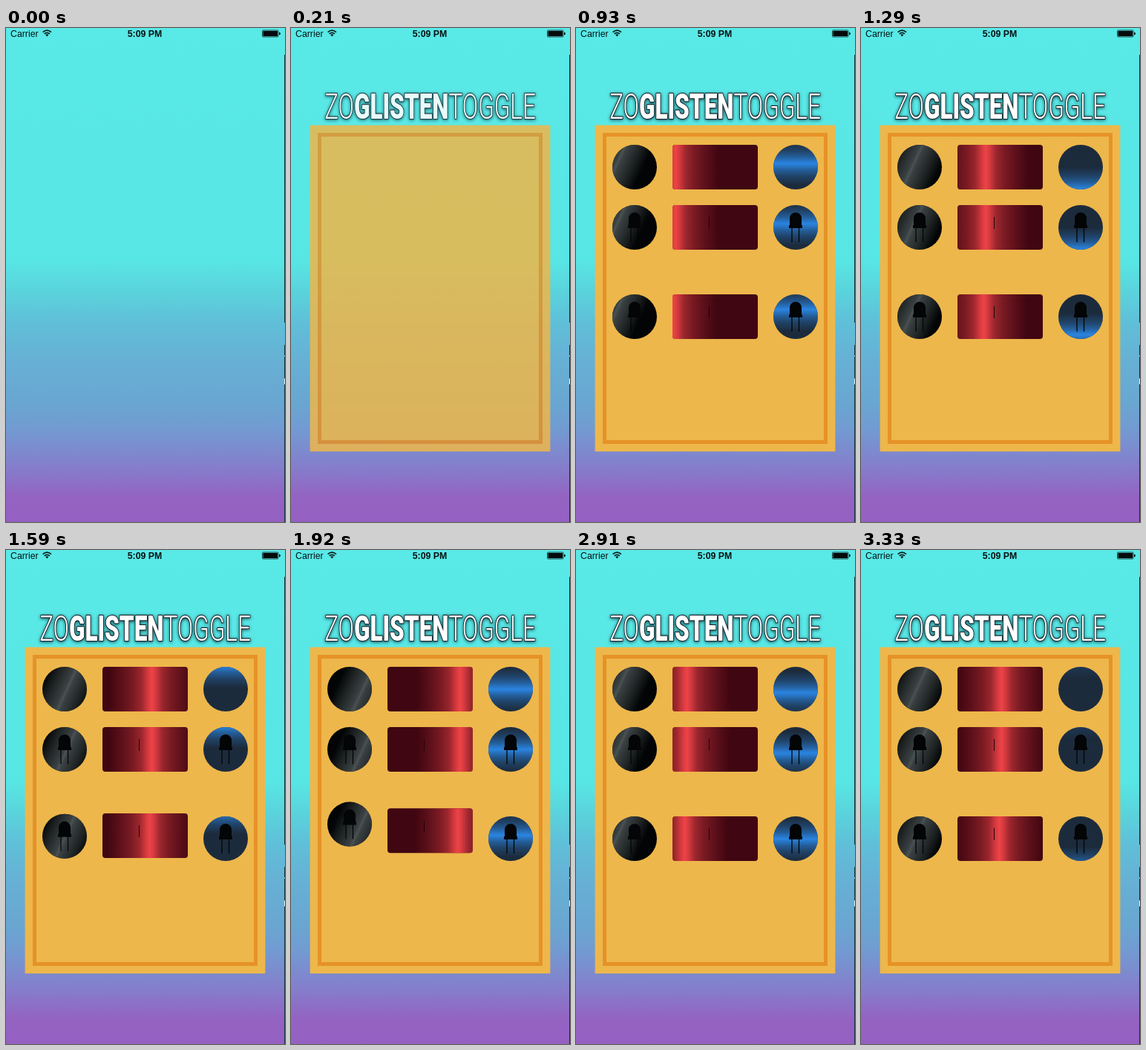
Write an HTML page that moves like this. It is 376 px wide and 664 px high and loops after 3.36 s.

```html
<!DOCTYPE html>
<html lang="en">
<head>
<meta charset="utf-8">
<title>Shimmering buttons</title>
<style>
  html, body { margin: 0; width: 100%; height: 100%; overflow: hidden; background: #59e8e6; }
  svg { display: block; width: 376px; height: 664px; }
  .status { font: 12.3px "Liberation Sans", Arial, sans-serif; fill: #071213; }
  .clock { font-weight: bold; text-anchor: middle; }
  .title {
    font: 300 48.5px Roboto, sans-serif; fill: #fff;
    stroke: #0d1c24; stroke-width: 2.2; stroke-linejoin: round; paint-order: stroke;
  }
  .title .bold { font-weight: 900; }
  .shade { filter: drop-shadow(0 1px 2px rgba(0, 20, 30, .75)); }
</style>
</head>
<body>
<svg viewBox="0 0 376 664" xmlns="http://www.w3.org/2000/svg">
  <defs id="defs">
    <linearGradient id="sky" x1="0" y1="0" x2="0" y2="664" gradientUnits="userSpaceOnUse">
      <stop offset="0" stop-color="#59e9e7"/>
      <stop offset=".47" stop-color="#58e6e4"/>
      <stop offset=".53" stop-color="#5ad4dc"/>
      <stop offset=".6" stop-color="#60bed8"/>
      <stop offset=".68" stop-color="#67afd4"/>
      <stop offset=".76" stop-color="#69a6d1"/>
      <stop offset=".81" stop-color="#729bd2"/>
      <stop offset=".89" stop-color="#857dcb"/>
      <stop offset=".95" stop-color="#9463c2"/>
      <stop offset="1" stop-color="#9560c2"/>
    </linearGradient>
    <g id="led" fill="#030506">
      <path d="M-8-3V-12A8 8 0 0 1 8-12V-3H9V1H-9V-3Z"/>
      <path d="M-5 0V20M4.5 0V20" stroke="#030506" stroke-width="1.3"/>
    </g>
  </defs>

  <rect width="376" height="664" fill="url(#sky)"/>
  <path d="M375.5 36V396M375.5 426V440M375.5 442V471M375.5 479V664" stroke="#12343c"/>
  <path d="M375.5 471V479" stroke="#d5eef2"/>

  <text class="status" x="6" y="11.6">Carrier</text>
  <text class="status clock" x="187" y="11.6">5:09 PM</text>
  <g fill="none" stroke="#0c1b1c" stroke-width="1.7">
    <path d="M49.6 5.6Q55.3 .6 61 5.6M51.7 7.9Q55.3 4.7 58.9 7.9"/>
    <path d="M53.2 9.1Q55.3 7.5 57.4 9.1L55.3 11.6Z" fill="#0c1b1c" stroke="none"/>
  </g>
  <rect x="345.5" y="3" width="21.5" height="9" rx="1.2" fill="none" stroke="#0c1b1c" stroke-width=".8"/>
  <rect x="346.4" y="3.9" width="19.7" height="7.2" rx=".6" fill="#050b0c"/>
  <path d="M368 5.6Q370 6 370 7.5T368 9.4Z" fill="#0c1b1c"/>

  <g id="scene" opacity="0">
    <g class="shade">
      <text class="title" text-anchor="middle" transform="translate(187.5 121.8) scale(.65 1)">ZO<tspan class="bold">GLISTEN</tspan>TOGGLE</text>
    </g>
    <rect x="25.6" y="130.6" width="323.8" height="438.6" fill="#edb74b"/>
    <rect x="38.5" y="143.5" width="298" height="413" fill="none" stroke="#e69227" stroke-width="5"/>
  </g>
  <g id="buttons"></g>
</svg>

<script>
const LOOP = 3360;
const rows = [187, 268, 388];

// mid: a time when the glint crosses the centre; stops: [distance, opacity];
// fade: distance over which the glint dims at both ends of its run
const columns = [
  { x: 79, w: 60, span: 76, speed: .04, mid: 1515, turn: 25, fade: 12, start: 500,
    base: '#020405', glow: '#4a5253', stops: [[0, 1], [3, .78], [12, .57], [22, .33], [34, 0]],
    pops: [[382, .1], [340, .085], [340, .1]], lag: 50,
    hop: [[1500, 0], [1860, -20], [2420, -2], [2700, 0]] },
  { x: 187.5, w: 115, span: 172.5, speed: .0949, mid: 1495, turn: 0, fade: 6, start: 570,
    base: '#400611', glow: '#ee4347', stops: [[0, 1], [5, .86], [14, .53], [25, .34], [40, .17], [58, 0]],
    pops: [[340, .085], [340, .085], [340, .155]], lag: 30,
    hop: [[1500, 0], [1760, -14], [2300, 1.5], [2700, 0]] },
  { x: 296, w: 60, span: 89, speed: .0949, mid: 1920, turn: 90, fade: 1, start: 570,
    base: '#1c2b3c', glow: '#2a84e0', stops: [[0, 1], [3, .86], [9, .56], [17, .27], [29, 0]],
    pops: [[340, .085], [340, .085], [340, .19]], lag: 50,
    hop: [[1940, 0], [2240, 11], [2700, 0]] }
];

const byId = id => document.getElementById(id);
const clamp = v => Math.max(0, Math.min(1, v));
const mod = (a, n) => ((a % n) + n) % n;

function add(parent, tag, attrs) {
  const el = document.createElementNS('http://www.w3.org/2000/svg', tag);
  for (const key in attrs) el.setAttribute(key, attrs[key]);
  return parent.appendChild(el);
}

// Smooth interpolation through [time, value] pairs
function track(t, keys) {
  if (t <= keys[0][0]) return keys[0][1];
  for (let i = 1; i < keys.length; i++) {
    const [t0, a] = keys[i - 1], [t1, b] = keys[i];
    if (t < t1) {
      const u = (t - t0) / (t1 - t0);
      return a + (b - a) * u * u * (3 - 2 * u);
    }
  }
  return keys[keys.length - 1][1];
}

const pop = (t, [start, over]) =>
  track(t - start, [[0, 0], [230, 1 + over], [430, .98], [560, 1]]);

function makeGradient(col, id) {
  const reach = col.stops[col.stops.length - 1][0];
  const grad = add(byId('defs'), 'linearGradient',
    { id, gradientUnits: 'userSpaceOnUse', x1: -reach, x2: reach, y1: 0, y2: 0 });
  const left = col.stops.slice(1).reverse().map(([d, a]) => [-d, a]);
  for (const [d, a] of [...left, ...col.stops])
    add(grad, 'stop', { offset: .5 + d / reach / 2, 'stop-color': col.glow, 'stop-opacity': a });
  return grad;
}

function makeButton(col, c, row) {
  const id = `glint${c}${row}`;
  const grad = makeGradient(col, id);
  const group = add(byId('buttons'), 'g', {});
  const box = { x: -col.w / 2, y: -30, width: col.w, height: 60, rx: c === 1 ? 4 : 30 };
  add(group, 'rect', { ...box, fill: col.base });
  const shine = add(group, 'rect', { ...box, fill: `url(#${id})` });
  if (row > 0) {
    if (c === 1) add(group, 'path', { d: 'M-8-14V2', stroke: '#25040a', 'stroke-width': 1 });
    else add(group, 'use', { href: '#led' });
  }
  return { col, c, row, grad, group, shine };
}

const buttons = columns.flatMap((col, c) => rows.map((_, row) => makeButton(col, c, row)));

function drawButton({ col, c, row, grad, group, shine }, t) {
  const last = row === 2;
  const y = rows[row] + (last ? track(t, col.hop) : 0);
  group.setAttribute('transform', `translate(${col.x} ${y}) scale(${pop(t, col.pops[row])})`);

  const clock = t - (last ? col.lag : 0);
  const half = col.span / 2;
  let pos = mod((clock - col.mid) * col.speed + half, col.span) - half;
  let alpha = clamp((t - col.start) / 200) * clamp((half - Math.abs(pos)) / col.fade);
  // The lower left buttons hold a glint until their shimmer starts
  if (c === 0 && row > 0 && t < 640) {
    pos = -12;
    alpha = .75;
  }
  grad.setAttribute('gradientTransform', `rotate(${col.turn}) translate(${pos} 0)`);
  shine.setAttribute('opacity', alpha);
}

function draw(t) {
  byId('scene').setAttribute('opacity', clamp((t - 30) / 210));
  for (const b of buttons) drawButton(b, t);
}

const begin = performance.now();
function tick() {
  draw((performance.now() - begin) % LOOP);
  requestAnimationFrame(tick);
}
draw(0);
requestAnimationFrame(tick);
</script>
</body>
</html>
```
